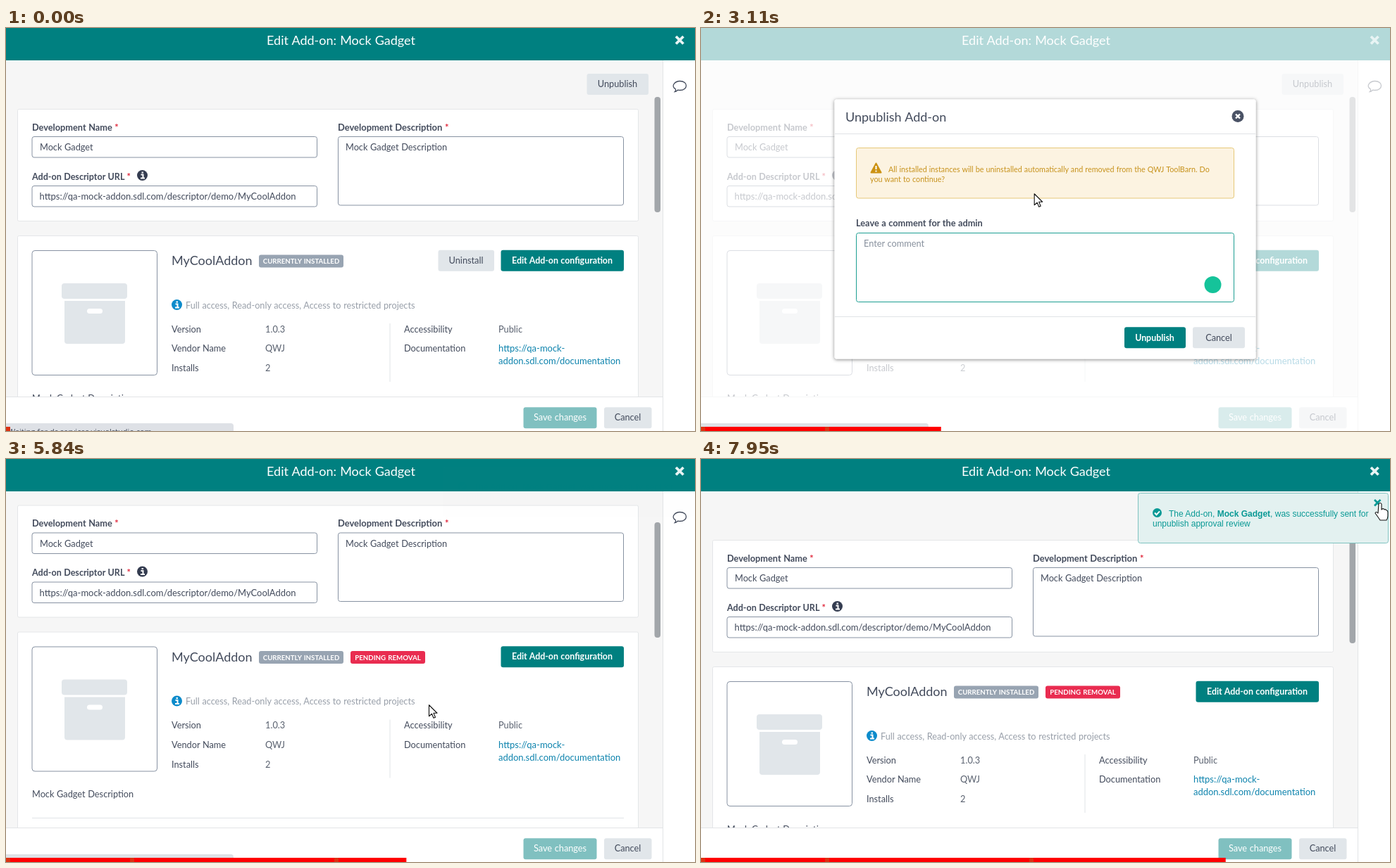
An HTML page for the animation above (8000 ms loop, 978 px wide and 573 px high).

```html
<!DOCTYPE html>
<html lang="en">
<head>
<meta charset="utf-8">
<title>Edit Add-on</title>
<style>
html, body { margin: 0; width: 100%; height: 100%; overflow: hidden; background: #fff; }
svg { display: block; width: 978px; height: 573px; }
text { font: 12.75px Lato, sans-serif; word-spacing: .03em; fill: #434b5c; white-space: pre; }
.b { font-weight: 700; }
.big { font-size: 18px; }
.mid { text-anchor: middle; }
.white { fill: #fff; }
.val { fill: #59616f; }
.hint { font-size: 12.7px; fill: #989fa9; }
.url { font-size: 12.98px; }
.link { fill: #0d83ad; }
.req { fill: #e0263a; }
.tag { font-size: 9.7px; font-weight: 700; fill: #fff; text-anchor: middle; word-spacing: .08em; }
.action { font-size: 12.4px; }
.warn { font-size: 10.77px; fill: #c7921c; }
.toast { font: 12px "Liberation Sans", Arial, sans-serif; word-spacing: 0; fill: #0a9995; }
.field { fill: #fff; stroke: #8792a2; }
.card { fill: #fff; stroke: #e4e6e8; }
.grey { fill: #e1e6ea; }
.teal { fill: #008080; }
.hover { fill: #d0d6dc; }
.cross { fill: none; stroke-width: 3.8; }
.pointer { fill: #fff; stroke: #111; stroke-width: 1.1; stroke-linejoin: round; }
</style>
</head>
<body>
<svg viewBox="0 0 978 573">
  <defs>
    <clipPath id="view"><rect y="45" width="932" height="479"/></clipPath>
    <filter id="shadow" x="-5%" y="-5%" width="110%" height="112%">
      <feDropShadow dx="0" dy="1" stdDeviation="2.5" flood-color="#000" flood-opacity=".5"/>
    </filter>
  </defs>

  <rect width="978" height="573" fill="#f6f6f6"/>
  <g clip-path="url(#view)">
    <g id="unpublish">
      <rect id="unpublishBox" class="grey" x="824.5" y="65" width="87.5" height="30" rx="3"/>
      <text class="mid" x="868" y="84">Unpublish</text>
    </g>
    <g id="page">
      <rect class="card" x="16.5" y="115.5" width="881" height="159" rx="2"/>
      <text class="b" x="37" y="145.5">Development Name <tspan class="req">*</tspan></text>
      <rect class="field" x="37" y="154.5" width="404.5" height="29.5" rx="3"/>
      <text x="48" y="174">Mock Gadget</text>
      <text class="b" x="37" y="215.5" style="font-size:12.55px">Add-on Descriptor URL <tspan class="req">*</tspan></text>
      <circle cx="193.5" cy="209.5" r="7.5" fill="#343c50"/>
      <path d="M191.5 208.5h3v5m-3.5 0h6M192.5 205.5h2.5" stroke="#fff" stroke-width="2" fill="none"/>
      <rect class="field" x="37" y="224.5" width="404.5" height="29.5" rx="3"/>
      <text class="url" x="47.5" y="244">https://qa-mock-addon.sdl.com/descriptor/demo/MyCoolAddon</text>
      <text class="b" x="471" y="145.5" style="font-size:12.95px">Development Description <tspan class="req">*</tspan></text>
      <rect class="field" x="471.5" y="154.5" width="405" height="97.5" rx="3"/>
      <text x="482" y="174">Mock Gadget Description</text>

      <rect class="card" x="16.5" y="295.5" width="881" height="320" rx="2"/>
      <rect class="field" x="37" y="316.5" width="177.5" height="177" rx="4"/>
      <rect class="grey" x="79" y="363" width="93" height="22" rx="4"/>
      <path class="grey" d="M83 388h86v57q0 4-4 4h-78q-4 0-4-4z"/>
      <rect x="115" y="399" width="22" height="7" rx="3.5" fill="#fff"/>
      <text class="big" x="235" y="337">MyCoolAddon</text>
      <rect x="359" y="322.5" width="120" height="18" rx="3" fill="#98a4b2"/>
      <text class="tag" x="419" y="335">CURRENTLY INSTALLED</text>
      <g id="pending">
        <rect x="489" y="322.5" width="106" height="18" rx="3" fill="#e92c50"/>
        <text class="tag" x="542" y="335">PENDING REMOVAL</text>
      </g>
      <g id="uninstall">
        <rect class="grey" x="613.5" y="315.7" width="79.5" height="30" rx="3"/>
        <text class="mid" x="653" y="334.5">Uninstall</text>
      </g>
      <rect class="teal" x="702.5" y="315.7" width="174.5" height="30" rx="3"/>
      <text class="b mid white action" x="789.5" y="334.5">Edit Add-on configuration</text>
      <circle cx="242.5" cy="393.5" r="7.5" fill="#0c8bcb"/>
      <path d="M240.5 392.5h3v5m-3.5 0h6M241.5 389.5h2.5" stroke="#fff" stroke-width="2" fill="none"/>
      <text class="hint" x="255" y="398.5">Full access, Read-only access, Access to restricted projects</text>
      <text x="235" y="432.5">Version</text><text class="val" x="368" y="432.5">1.0.3</text>
      <text x="235" y="460">Vendor Name</text><text class="val" x="368" y="460">QWJ</text>
      <text x="235" y="488">Installs</text><text class="val" x="368" y="488">2</text>
      <path d="M545 420v83M37 560h840" stroke="#e1e4e7"/>
      <text x="565" y="432.5">Accessibility</text><text class="val" x="699" y="432.5">Public</text>
      <text x="565" y="460">Documentation</text>
      <text class="url link" x="699" y="460">https://qa-mock-</text>
      <text class="url link" x="699" y="478">addon.sdl.com/documentation</text>
      <text x="37" y="530.5">Mock Gadget Description</text>
    </g>
    <rect id="thumb" x="920.5" y="98" width="8.5" height="164" rx="4" fill="#a2a6aa"/>
  </g>

  <rect x="932" y="45" width="46" height="528" fill="#fff"/>
  <rect y="524" width="932" height="49" fill="#fff"/>
  <path d="M0 524.5h932M932.5 45v528" stroke="#e2e4e6"/>
  <path d="M949.5 90.5q1.5-1.5 1-3.5c-8-5 0-11.5 6-11.5 12 0 12 13 0 13q-1.5 0-3-.3-2 2-4 2.3z" fill="none" stroke="#434b5c" stroke-width="1.3"/>
  <rect x="734.5" y="539.3" width="104" height="30" rx="3" fill="#80c0c0"/>
  <text class="mid white" x="786.5" y="558">Save changes</text>
  <rect class="grey" x="849" y="539.3" width="67.5" height="30" rx="3"/>
  <text class="mid" x="882.5" y="558">Cancel</text>

  <rect class="teal" width="978" height="46"/>
  <text class="big mid white" x="475.5" y="24">Edit Add-on: Mock Gadget</text>
  <rect id="veil" width="978" height="573" fill="#fff"/>
  <path class="cross" d="M951 12l10.5 10.5m0-10.5L951 22.5" stroke="#e8f4f4"/>

  <g id="modal">
    <rect x="189.5" y="101.5" width="598" height="369" rx="3" fill="#fff" filter="url(#shadow)"/>
    <path d="M190 150.5h597M190 410.5h597" stroke="#e0e3e6"/>
    <text class="big" x="205" y="132.5">Unpublish Add-on</text>
    <circle cx="762" cy="125.5" r="8.5" fill="#4a5265"/>
    <path d="M759 122.5l6 6m0-6l-6 6" stroke="#fff" stroke-width="2.4"/>
    <rect x="220.5" y="170.5" width="536" height="71.5" rx="3" fill="#fcf3e1" stroke="#e6c878"/>
    <path d="M248.5 192.5l7 13h-14z" fill="#cc9212" stroke="#cc9212" stroke-width="2" stroke-linejoin="round"/>
    <path d="M248.5 196v5m0 1.5v2" stroke="#fff" stroke-width="2"/>
    <text class="warn" x="266" y="205">All installed instances will be uninstalled automatically and removed from the QWJ ToolBarn. Do</text>
    <text class="warn" x="240" y="219">you want to continue?</text>
    <text class="b" x="220" y="282">Leave a comment for the admin</text>
    <rect id="comment" x="220.5" y="291.5" width="536" height="98" rx="3" fill="#fff"/>
    <text x="231" y="311" style="fill:#87909d">Enter comment</text>
    <path id="caret" d="M231.5 299v15" stroke="#222"/>
    <circle cx="726.5" cy="365" r="12" fill="#15c39a"/>
    <path id="busy" d="M0-6.5A6.5 6.5 0 0 1 0 6.5" fill="none" stroke="#d8fff3" stroke-width="1.8"/>
    <rect id="confirm" x="601" y="425.3" width="87" height="30" rx="3"/>
    <text class="b mid white action" x="644" y="444.5">Unpublish</text>
    <rect class="grey" x="698" y="425.3" width="74" height="30" rx="3"/>
    <text class="mid" x="735" y="444.5">Cancel</text>
    <rect id="haze" x="190" y="102" width="597" height="368" rx="3" fill="#fff"/>
    <path id="spinner" d="M12-8.5A14.7 14.7 0 1 0 7.5 12.7" fill="none" stroke="#008080" stroke-width="2"/>
  </g>

  <g id="toast">
    <rect x="620.5" y="48.5" width="355" height="71" rx="3" fill="#e3f1f0" stroke="#7fc3c0"/>
    <circle cx="647.5" cy="76.5" r="6.5" fill="#0a9995"/>
    <path d="M644 76.5l2.5 2.7 4.5-4.8" fill="none" stroke="#fff" stroke-width="2"/>
    <text class="toast" x="664" y="82">The Add-on, <tspan class="b">Mock Gadget</tspan>, was successfully sent for</text>
    <text class="toast" x="641" y="96">unpublish approval review</text>
    <path class="cross" d="M956 58l8.5 8.5m0-8.5l-8.5 8.5" stroke="#0a9995" style="stroke-width:2.8"/>
  </g>

  <g id="status">
    <path d="M0 562h319q4 0 4 4v7H0z" fill="#dee1e6"/>
    <text x="3" y="578" style="font:11px 'Open Sans',sans-serif;word-spacing:0">Waiting for dc.services.visualstudio.com...</text>
  </g>
  <g id="cursor">
    <path id="arrow" class="pointer" d="M0 0V16L4 12.5 6.5 18.5 9 17.5 6.5 11.5H11.5Z"/>
    <path id="hand" class="pointer" d="M-2 1q2-3 4 0v8l1-1q2-1 3 1 2-1 3 1 2 0 2 3v5q0 3-2 6h-9q-4-6-7-10 1-3 4 0z"/>
  </g>
  <rect id="bar" y="567" height="6" fill="#f00"/>
  <g id="marks" fill="#dc3212">
    <rect y="567" width="6" height="6"/>
    <rect x="176" y="567" width="6" height="6"/>
    <rect x="466" y="567" width="6" height="6"/>
  </g>
</svg>
<script>
const LOOP = 8000, STEP = 67.8;
const $ = id => document.getElementById(id);
const set = (id, name, value) => $(id).setAttribute(name, value);
const show = (id, on) => set(id, 'visibility', on ? 'visible' : 'hidden');
const move = (id, x, y, turn = 0) => set(id, 'transform', `translate(${x} ${y}) rotate(${turn})`);
const ramp = (t, from, to) => Math.min(1, Math.max(0, (t - from) / (to - from)));
const within = (t, from, to) => t >= from && t < to;

// time, x, y of the pointer tip
const path = [
  [70, 760, 250], [420, 862, 82], [900, 856, 80], [1140, 825, 96],
  [1720, 420, 200], [2220, 199, 244], [2480, 226, 238], [2850, 380, 214],
  [3360, 560, 256], [3800, 648, 425], [4130, 643, 457], [4300, 641, 442],
  [4600, 638, 440], [5230, 545, 403], [5800, 600, 350], [6520, 648, 324],
  [7000, 690, 300], [7410, 788, 262], [7780, 945, 85], [7950, 964, 63], [8000, 964, 63]
];

function pointerAt(t) {
  const i = Math.max(1, path.findIndex(p => p[0] > t));
  const [a, b] = [path[i - 1], path[i]];
  const k = ramp(t, a[0], b[0]), s = k * k * (3 - 2 * k);
  return [a[1] + (b[1] - a[1]) * s, a[2] + (b[2] - a[2]) * s];
}

function render(t) {
  const open = ramp(t, 1420, 1650) * (1 - ramp(t, 5450, 5600));
  set('veil', 'opacity', .7 * open);
  set('modal', 'opacity', open);
  set('haze', 'opacity', .4 * ramp(t, 4420, 4620));
  set('comment', 'stroke', t < 4400 ? '#1c9e92' : '#727d8d');
  show('caret', within(t, 2200, 4200) && Math.floor((t - 1600) / 500) % 2 === 0);
  show('busy', t < 2900);
  move('busy', 726.5, 365, (t - 2220) * .36 - 15);
  show('spinner', within(t, 4500, 5600));
  move('spinner', 488, 286, (t - 5230) * .36);

  const updated = t >= 5600;
  const shifted = within(t, 5600, 6570);
  show('unpublish', !updated);
  show('uninstall', !updated);
  show('pending', updated);
  move('page', 0, shifted ? -49.5 : 0);
  move('thumb', 0, shifted ? -8 : 0);

  const arrive = ramp(t, 5840, 6040);
  set('toast', 'opacity', arrive);
  move('toast', 0, -38 * (1 - arrive) ** 2);

  const overFirst = within(t, 350, 1010);
  const overConfirm = within(t, 4190, 4850);
  const hand = overFirst || overConfirm || t > 7900;
  set('unpublishBox', 'class', overFirst ? 'hover' : 'grey');
  set('confirm', 'fill', overConfirm ? '#006e6e' : '#008080');
  show('arrow', t >= 70 && !hand);
  show('hand', t >= 70 && hand);
  move('cursor', ...pointerAt(t));

  const step = Math.min(117, Math.floor(t / STEP + .2));
  const width = step ? 79 + 5.69 * step : 6;
  set('bar', 'width', width);
  for (const mark of $('marks').children) {
    mark.setAttribute('visibility', mark.x.baseVal.value + 6 <= width ? 'visible' : 'hidden');
  }
  show('status', t < 7000);
}

const start = performance.now();
function tick() {
  render((performance.now() - start) % LOOP);
  requestAnimationFrame(tick);
}
tick();
</script>
</body>
</html>
```
